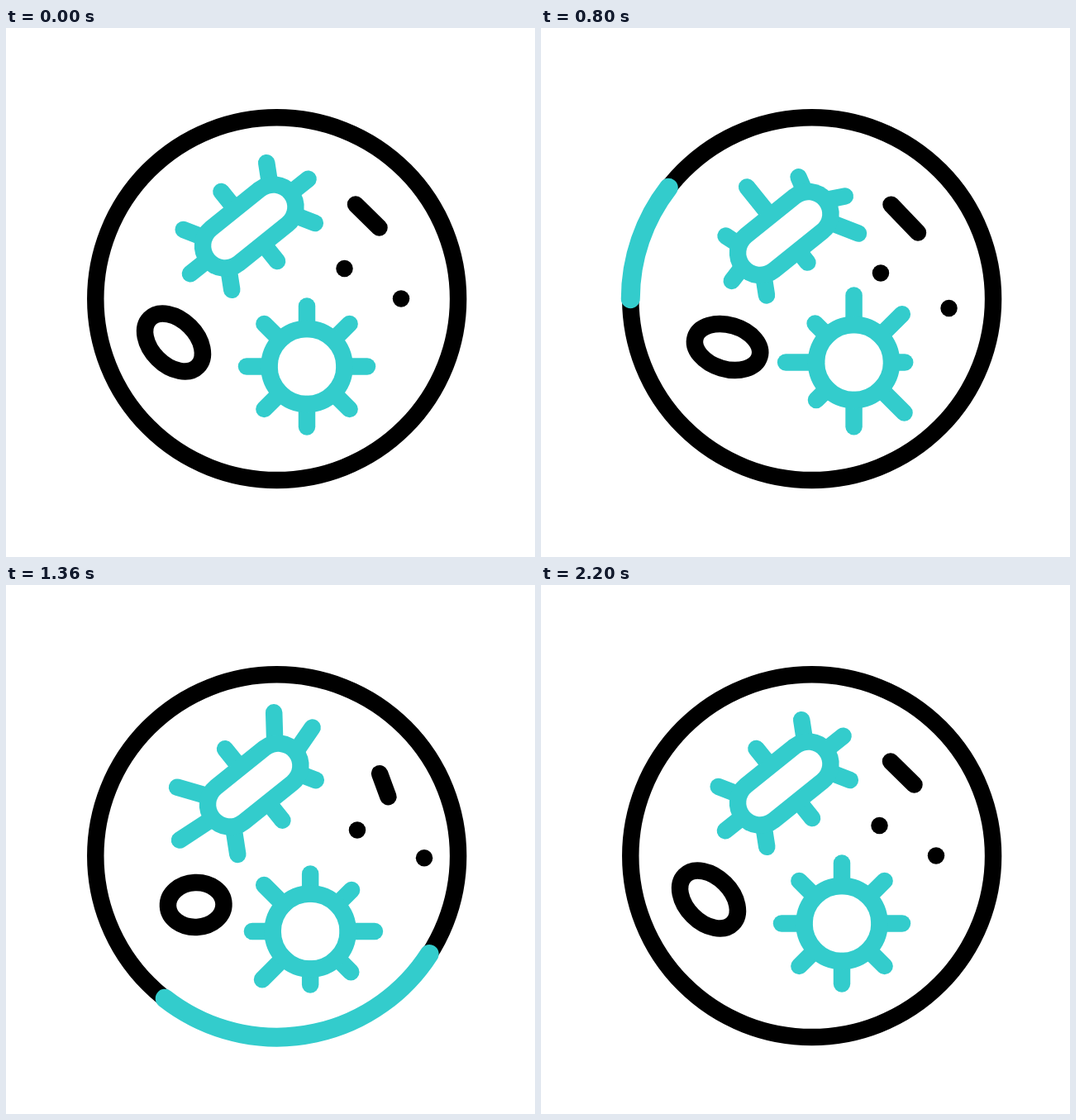
An HTML page with a canvas that plays this animation: 640x640 px, repeating every 2400 ms.

```html
<!DOCTYPE html>
<html lang="en">
<head>
<meta charset="utf-8">
<title>Petri dish</title>
<style>
  html, body { margin: 0; height: 100%; overflow: hidden; background: #fff; }
  canvas { display: block; width: 100vmin; height: 100vmin; }
</style>
</head>
<body>
<canvas id="stage" width="640" height="640"></canvas>
<script>
const ctx = document.getElementById('stage').getContext('2d');
const TEAL = '#33cccc', BLACK = '#000', WHITE = '#fff';
const LOOP = 2400, TAU = Math.PI * 2, WIDTH = 20.48;
const ROD = { x: 294.25, y: 240, tilt: -0.677, half: 37.5, r: 27 };
const VIRUS_R = 45.5;

const rad = deg => deg * TAU / 360;
const mix = (a, b, k) => a + (b - a) * k;
const clamp = x => Math.min(1, Math.max(0, x));
const smooth = x => x * x * (3 - 2 * x);
const even = reach => Array(8).fill(reach);

// A part passes through its poses at the key times and returns to the first.
// soft goes from 0 (linear) to 1 (full ease in and out).
const parts = {
  // shift of the body, lean, reach of the spikes
  rod: { soft: 0.5, times: [200, 800, 1400, 2200], poses: [
    [0, 0, 0, ...even(54)],
    [0, 8.5, 1, 46, 48, 65, 45, 52, 48, 46, 72],
    [6.2, 1.8, -1, 65, 61.5, 48, 55, 61.5, 75.5, 68, 55.5]
  ] },
  // centre, reach of the spikes
  virus: { soft: 1, times: [200, 900, 1600, 2200], poses: [
    [364, 409.5, ...even(73)],
    [379.4, 404.2, 81.5, 83, 61, 87, 78, 64, 83, 66],
    [364, 424.5, 65, 66, 84, 63, 59.5, 89, 65.5, 84]
  ] },
  // centre, radii, angle
  cell: { soft: 1, times: [200, 1000, 1400, 1800, 2200], poses: [
    [203, 380.5, 41, 27.5, 45],
    [229.7, 387, 40.5, 26.4, 11.5],
    [229.7, 387, 33.6, 27, -3],
    [224.8, 381.6, 32.3, 23.8, 10]
  ] },
  // both ends
  pill: { soft: 1, times: [200, 800, 1300, 1800, 2200], poses: [
    [423, 213.5, 451.5, 241.5],
    [423.5, 213.7, 456, 247.5],
    [452.5, 228.8, 463.3, 256.7],
    [443.2, 213.5, 441.9, 244.7]
  ] },
  dotA: { soft: 1, times: [200, 660, 1400, 1800, 2200], poses: [
    [409.5, 291], [409.5, 296.5], [425.1, 296.5], [417.5, 296.5]
  ] },
  dotB: { soft: 0, times: [200, 900, 1500, 2200], poses: [
    [478, 327.5], [496.1, 341], [509, 327]
  ] }
};

function poseAt({ soft, times, poses }, t) {
  let i = 0;
  while (i < times.length - 2 && t >= times[i + 1]) i++;
  const x = clamp((t - times[i]) / (times[i + 1] - times[i]));
  const k = mix(x, smooth(x), soft);
  const next = poses[(i + 1) % poses.length];
  return poses[i].map((v, j) => mix(v, next[j], k));
}

function stroke(color, width = WIDTH) {
  ctx.strokeStyle = color;
  ctx.lineWidth = width;
  ctx.stroke();
}

function line(x1, y1, x2, y2, color, width) {
  ctx.beginPath();
  ctx.moveTo(x1, y1);
  ctx.lineTo(x2, y2);
  stroke(color, width);
}

function arc(x, y, r, color, width, from = 0, to = TAU) {
  ctx.beginPath();
  ctx.arc(x, y, r, from, to);
  stroke(color, width);
}

// A spike grows outwards around (x, 0); lean pushes its tip sideways.
function spike(x, angle, root, reach, lean = 0) {
  const c = Math.cos(angle), s = Math.sin(angle);
  line(x + root * c, root * s, x + reach * c - lean * s, reach * s + lean * c, TEAL);
}

function drawDish(t) {
  const c = 327.68, r = 219.4;
  arc(c, c, r, BLACK);
  const head = smooth(clamp((t - 600) / 1000));
  const tail = smooth(clamp((t - 800) / 1000));
  if (head > tail) arc(c, c, r, TEAL, 23, Math.PI + tail * TAU, Math.PI + head * TAU);
}

function drawRod([dx, dy, lean, ...reach]) {
  const { x, y, tilt, half, r } = ROD;
  const leans = [-5, 11, 0, 0, 0, -5, 4, 0];
  ctx.save();
  ctx.translate(x + dx, y + dy);
  ctx.rotate(tilt);
  // three spikes fan out from each end, one from each long side
  reach.forEach((len, i) => {
    const deg = [-60, 0, 60, 90][i % 4];
    const side = i < 4 ? 1 : -1;
    const base = deg === 90 ? 0 : half * side;
    spike(base, rad(side > 0 ? deg : deg + 180), r, len, lean * leans[i]);
  });
  line(-half, 0, half, 0, TEAL, 2 * r + WIDTH);
  line(-half, 0, half, 0, WHITE, 2 * r - WIDTH);
  ctx.restore();
}

function drawVirus([x, y, ...reach]) {
  ctx.save();
  ctx.translate(x, y);
  reach.forEach((len, i) => spike(0, rad(i * 45 - 90), VIRUS_R, len));
  arc(0, 0, VIRUS_R, TEAL);
  ctx.restore();
}

function drawCell([x, y, rx, ry, deg]) {
  ctx.beginPath();
  ctx.ellipse(x, y, rx, ry, rad(deg), 0, TAU);
  stroke(BLACK);
}

function draw() {
  const t = performance.now() % LOOP;
  const pose = name => poseAt(parts[name], t);
  const dot = name => line(...pose(name), ...pose(name), BLACK);
  ctx.fillStyle = WHITE;
  ctx.fillRect(0, 0, 640, 640);
  ctx.lineCap = 'round';
  drawDish(t);
  drawRod(pose('rod'));
  drawVirus(pose('virus'));
  drawCell(pose('cell'));
  line(...pose('pill'), BLACK);
  dot('dotA');
  dot('dotB');
  requestAnimationFrame(draw);
}
draw();
</script>
</body>
</html>
```
